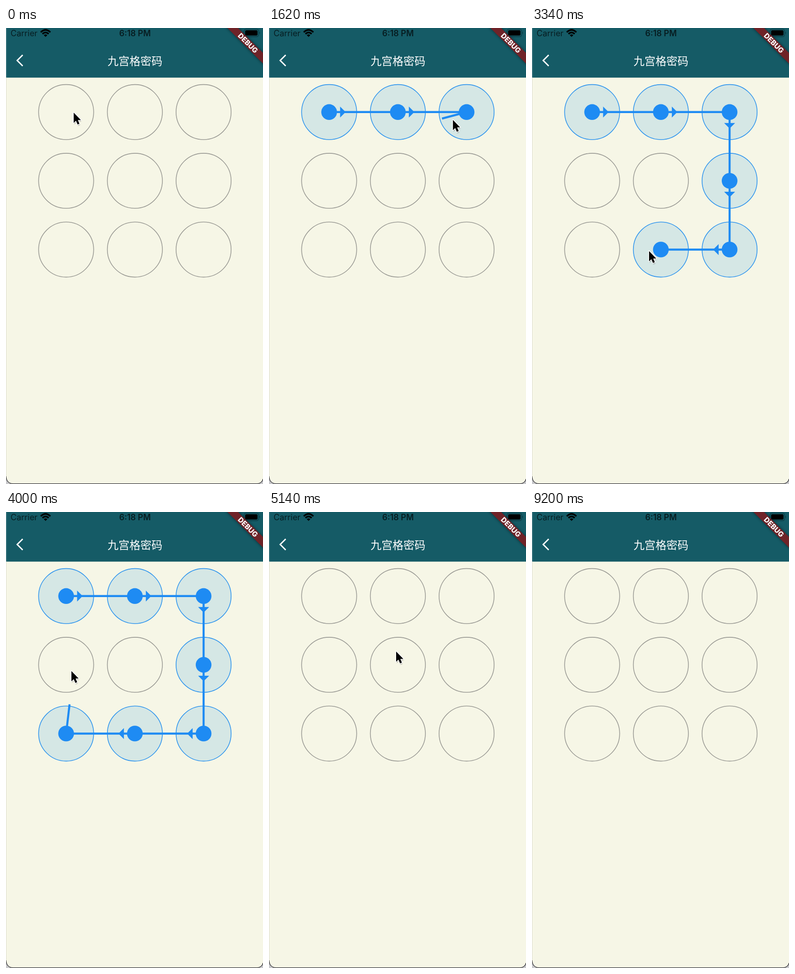
Animation of 562x997 px, one loop 9220 ms. Source, as an HTML page:

```html
<!DOCTYPE html>
<html lang="zh-CN">
<head>
<meta charset="utf-8">
<style>
  html, body { margin: 0; width: 100%; height: 100%; overflow: hidden; background: #f6f6e6; }
  svg { display: block; width: 100vw; height: 100vh; }
  text { font-family: Inter, "Liberation Sans", sans-serif; }
  .title { font-family: "Noto Sans CJK SC", "Noto Sans CJK", sans-serif; }
</style>
</head>
<body>
<svg viewBox="0 0 562 997">
  <defs>
    <filter id="soft" x="-30%" y="-100%" width="160%" height="300%"><feGaussianBlur stdDeviation="3"/></filter>
    <filter id="shade" x="-50%" y="-50%" width="200%" height="200%"><feGaussianBlur stdDeviation="1.3"/></filter>
    <path id="pointer" d="M0 0V22.5L5 17.8L8.6 26L12.6 24.3L9.2 16.3H15.8Z"/>
  </defs>

  <rect width="562" height="997" fill="#f6f6e6"/>
  <rect width="562" height="108.5" fill="#155b66"/>
  <rect width="1.5" height="108.5" fill="#4b808a"/>
  <rect y="108" width="1" height="878" fill="#dcdccf"/>
  <path d="M0 982Q1 996 14 997H0ZM562 985Q560 996 550 997H562Z" fill="#c9c9cc"/>
  <path d="M0 980Q1 995 14 996.4H550Q560 995 562 986" fill="none" stroke="#33333a" stroke-width="1.3"/>

  <text x="10" y="17.5" font-size="18" fill="#071d21">Carrier</text>
  <text x="282" y="17.5" font-size="18" font-weight="600" text-anchor="middle" fill="#071d21">6:18 PM</text>
  <g fill="none" stroke="#000" stroke-width="3.4">
    <path d="M76 9.3Q86.5 -1 97 9.3"/>
    <path d="M79.8 13Q86.5 6.6 93.2 13"/>
  </g>
  <path d="M82.6 15.6Q86.5 12.4 90.4 15.6L86.5 19.6Z"/>
  <rect x="520.5" y="2.5" width="32" height="16.5" rx="4.5" fill="none" stroke="#0b3a42" stroke-width="1.3"/>
  <rect x="523" y="5" width="27" height="11.5" rx="2.5"/>
  <path d="M554 8Q556.5 10.7 554 13.5Z" fill="#0b3a42"/>

  <path d="M36.5 59L24.5 71L36.5 83" fill="none" stroke="#fff" stroke-width="3"/>
  <text class="title" x="282" y="80.5" font-size="24" text-anchor="middle" fill="#fff">九宫格密码</text>

  <g transform="translate(562 0) rotate(45)">
    <rect x="-60" y="38.5" width="120" height="16.5" fill="#000" opacity=".5" filter="url(#soft)"/>
    <rect x="-60" y="38.5" width="120" height="16.5" fill="#6f2328"/>
    <text y="52.2" font-size="15.5" font-weight="800" text-anchor="middle" fill="#fff">DEBUG</text>
  </g>

  <g id="rings" stroke-width="1.6"></g>
  <path id="trail" fill="none" stroke="#1e8bf3" stroke-width="4.5"/>
  <g id="marks" fill="#1e8bf3"></g>
  <g id="cursor">
    <use href="#pointer" x="1" y="2.5" opacity=".4" filter="url(#shade)"/>
    <use href="#pointer" stroke="#fff" stroke-width="3" stroke-linejoin="round"/>
    <use href="#pointer"/>
  </g>
</svg>
<script>
const LOOP = 9220, PRESS = 500, RELEASE = 4680, LAG = 100, HIDE = 8250;
const RADIUS = 60.2;
const $ = id => document.getElementById(id);

// Pointer path: time, x, y
const route = [
  [0, 148, 185], [500, 148, 185], [720, 162, 188], [1000, 215, 194],
  [1520, 378, 198], [1620, 402, 201], [1820, 432, 204], [1950, 438, 220],
  [2150, 432, 280], [2640, 414, 436], [2740, 408, 443], [2900, 390, 478],
  [3150, 330, 488], [3500, 195, 487], [3720, 140, 478], [3900, 139, 421],
  [4000, 143, 348], [4150, 152, 331], [4350, 215, 326], [4550, 274, 308],
  [4680, 278, 305], [5400, 278, 305], [6100, 286, 476], [6800, 286, 476],
  [7360, 287, 475], [LOOP, 287, 475]
];

const slope = (i, k) => (route[i + 1][k] - route[i][k]) / (route[i + 1][0] - route[i][0]);

// Monotone tangents keep the pointer still during pauses
function tangent(i, k) {
  if (i === 0 || i === route.length - 1) return 0;
  const a = slope(i - 1, k), b = slope(i, k);
  return a * b > 0 ? 2 * a * b / (a + b) : 0;
}

function pointerAt(t) {
  t = Math.max(0, Math.min(t, LOOP - 1));
  const i = route.findIndex((p, n) => t < route[n + 1][0]);
  const span = route[i + 1][0] - route[i][0], u = (t - route[i][0]) / span, v = 1 - u;
  return [1, 2].map(k =>
    v * v * (1 + 2 * u) * route[i][k] + u * u * (3 - 2 * u) * route[i + 1][k] +
    span * u * v * (v * tangent(i, k) - u * tangent(i + 1, k)));
}

const touchAt = t => pointerAt(t - LAG);

const nodes = Array.from({ length: 9 }, (_, i) => ({
  x: 131.5 + 150.3 * (i % 3),
  y: 183.8 + 150.3 * Math.floor(i / 3)
}));

const hits = [];
for (let t = PRESS; t < RELEASE; t += 5) {
  const [x, y] = touchAt(t);
  for (const node of nodes) {
    const fresh = !hits.some(h => h.node === node);
    if (fresh && Math.hypot(x - node.x, y - node.y) < RADIUS) hits.push({ node, t });
  }
}

function add(parent, tag, attrs) {
  const el = document.createElementNS("http://www.w3.org/2000/svg", tag);
  for (const name in attrs) el.setAttribute(name, attrs[name]);
  return parent.appendChild(el);
}

for (const node of nodes) {
  node.ring = add($("rings"), "circle", { cx: node.x, cy: node.y, r: RADIUS });
}

hits.forEach((hit, i) => {
  const { x, y } = hit.node;
  hit.dot = add($("marks"), "circle", { cx: x, cy: y, r: 17.2 });
  if (!i) return;
  const from = hits[i - 1].node;
  const angle = Math.atan2(y - from.y, x - from.x) * 180 / Math.PI;
  hit.arrow = add($("marks"), "path", {
    d: "M24 -12L36 0L24 12Z",
    transform: `translate(${from.x} ${from.y}) rotate(${angle})`
  });
});

const show = (el, on) => el && el.setAttribute("visibility", on ? "visible" : "hidden");

function render(t) {
  const active = t < RELEASE ? hits.filter(h => h.t <= t) : [];
  for (const node of nodes) {
    const lit = active.some(h => h.node === node);
    node.ring.setAttribute("fill", lit ? "#d5e7e5" : "none");
    node.ring.setAttribute("stroke", lit ? "#2f95ee" : "#9b9b95");
  }
  for (const hit of hits) {
    const on = active.includes(hit);
    show(hit.dot, on);
    show(hit.arrow, on);
  }
  const points = active.map(h => [h.node.x, h.node.y]);
  if (points.length) points.push(touchAt(t));
  $("trail").setAttribute("d", points.length ? "M" + points.join("L") : "");
  $("cursor").setAttribute("transform", `translate(${pointerAt(t)})`);
  show($("cursor"), t < HIDE);
}

function tick() {
  render(performance.now() % LOOP);
  requestAnimationFrame(tick);
}
tick();
</script>
</body>
</html>
```
